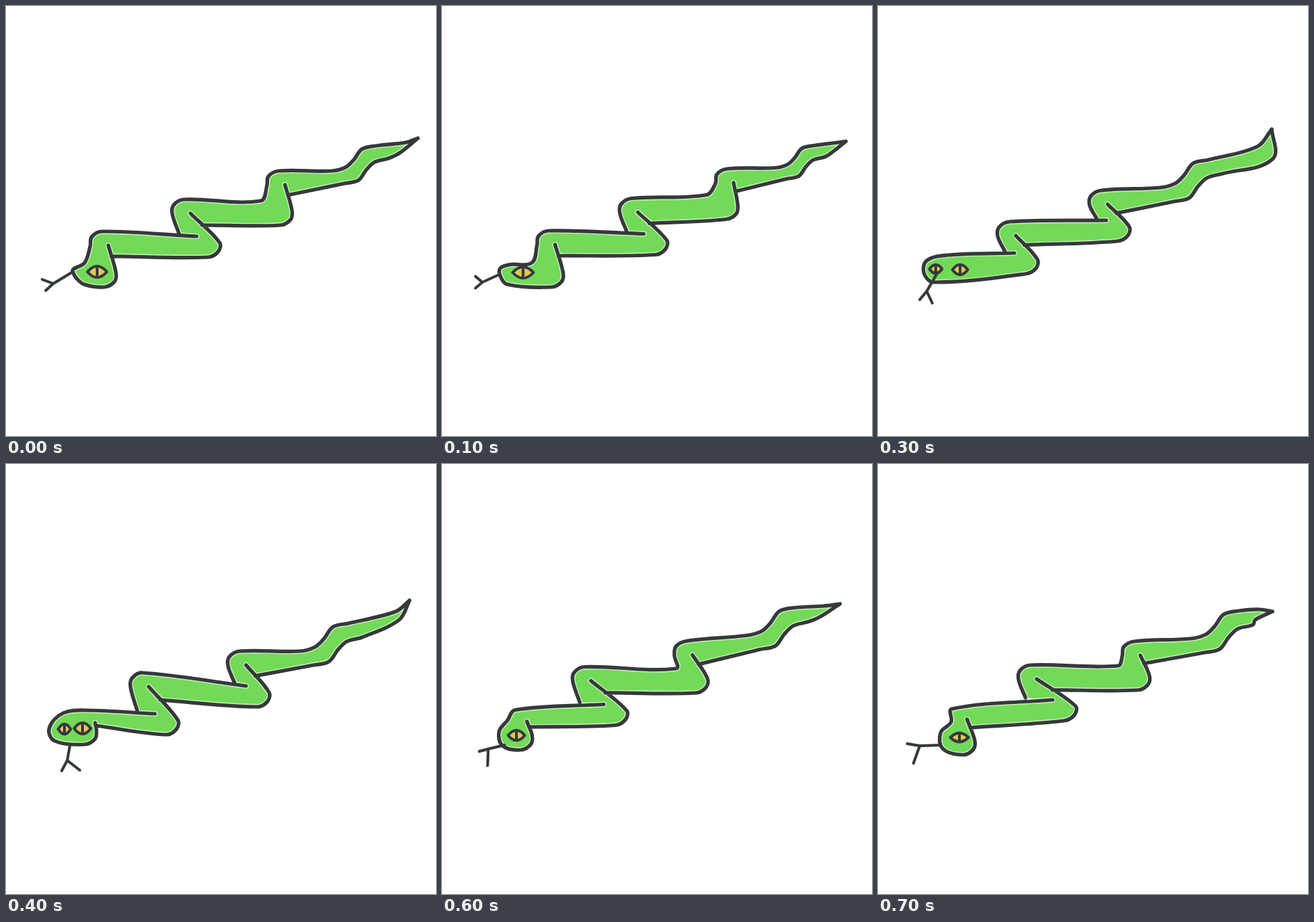
These frames come from a looping animation (618x618 px, 800 ms). An HTML page with a canvas:

```html
<!DOCTYPE html>
<html lang="en">
<head>
<meta charset="utf-8">
<title>Slithering snake</title>
<style>
html, body { margin: 0; width: 100%; height: 100%; overflow: hidden; background: #fff; }
canvas { display: block; width: 618px; height: 618px; }
</style>
</head>
<body>
<canvas id="stage" width="618" height="618"></canvas>
<script>
const ctx = document.getElementById('stage').getContext('2d');
const STEP = 100;
const INK = '#35393b', GREEN = '#72da58', PALE = '#cdeebb', IRIS = '#dfc957';

// tail: tip, a point above and a point below
// bends, tail to head: [x, y, size] is a wave, [left, top, right, bottom] a fold
// head: points round the snout; jaw: [right, bottom, crease x, crease y]
// tongue: root, fork, then the tips
const stretched = {
  tail: [[592, 190], [575, 196], [566, 211]],
  bends: [[509, 228, 0.9], [375, 237, 411, 315], [239, 278, 307, 361], [121, 324, 158, 404]],
  head: [[97, 378], [96, 382], [101, 391], [112, 400]],
  eyes: [[131, 382, 14, 9]],
  tongue: [[96, 382], [68, 399], [52, 393], [57, 409]]
};
const lowHead = {
  tail: [[569, 199], [557, 197], [556, 209]],
  bends: [[521, 221, 0.7], [411, 231, 439, 298], [272, 275, 339, 354], [152, 322, 190, 404]],
  head: [[100, 365], [72, 371], [66, 384], [75, 400]],
  eyes: [[102, 384, 16, 9]],
  tongue: [[66, 391], [48, 395], [44, 384], [39, 402]]
};
const facing = {
  tail: [[566, 177], [545, 202], [567, 220]],
  bends: [[450, 251, 1], [304, 265, 361, 338], [172, 310, 229, 385]],
  head: [[100, 358], [70, 366], [66, 384], [80, 397]],
  eyes: [[83, 378, 9, 7], [118, 379, 11, 8]],
  tongue: [[84, 386], [70, 410], [60, 422], [78, 427]]
};
const roundHead = {
  tail: [[580, 196], [560, 212], [565, 224]],
  bends: [[467, 259, 1], [319, 269, 378, 349], [179, 300, 247, 389]],
  head: [[115, 354], [82, 358], [62, 380], [70, 398]],
  jaw: [130, 403, 128, 372],
  eyes: [[84, 381, 9, 8], [110, 380, 12, 9]],
  tongue: [[92, 404], [88, 426], [80, 441], [106, 440]]
};
const turning = {
  tail: [[577, 190], [550, 199], [545, 215]],
  bends: [[470, 232, 1], [317, 254, 373, 333], [174, 294, 247, 382]],
  head: [[104, 355], [83, 366], [74, 383], [81, 401]],
  jaw: [120, 404, 116, 373],
  eyes: [[97, 387, 11, 9]],
  tongue: [[90, 404], [73, 414], [65, 424], [80, 437]]
};
const sideHead = {
  tail: [[567, 212], [548, 209], [542, 224]],
  bends: [[494, 241, 1], [351, 255, 390, 325], [202, 289, 284, 369]],
  head: [[106, 352], [105, 371], [90, 386], [93, 409]],
  jaw: [139, 418, 128, 367],
  eyes: [[117, 393, 13, 7]],
  tongue: [[90, 404], [60, 405], [42, 402], [51, 430]]
};

function mid(a, b) {
  if (typeof a === 'number') return (a + b) / 2;
  if (Array.isArray(a)) return a.map((v, i) => mid(v, b[i]));
  return Object.fromEntries(Object.keys(a).map(k => [k, mid(a[k], b[k])]));
}

const poses = [
  stretched, mid(stretched, lowHead), lowHead, facing,
  roundHead, turning, mid(turning, sideHead), sideHead
];

// each bend looks the same after half a turn: side 1 is the back, -1 the belly
const WAVE = [[25, -30], [3, -25], [-10, -8], [-23, 4], [-45, 10]];
const wave = ([x, y, size], side) =>
  WAVE.map(([dx, dy]) => [x + dx * size * side, y + dy * size * side]);
const corner = (x, y, side) =>
  [[x + 17 * side, y], [x + 2 * side, y + 8 * side], [x, y + 21 * side]];

// pen strokes from the tail along the back, round the head and home below
function outline({ tail: [tip, above, below], bends, head, jaw }) {
  const strokes = [[tip, above]];
  const add = (...pts) => strokes[strokes.length - 1].push(...pts);
  const lift = p => strokes.push([p]);

  function crease(x, y, ex, ey) {
    add(...corner(x, y, -1), [ex, ey]);
    lift([x + (ex - x) * 0.6, y - 21 + (ey - y + 21) * 0.6]);
  }

  for (const bend of bends) {
    const [x, y, right, bottom] = bend;
    if (bend.length === 3) {
      add(...wave(bend, 1));
      continue;
    }
    add(...corner(x, y, 1));
    if (right - x > 56) {
      add([x + 10, bottom - 33]);
      lift([right - 33, bottom - 30]);
    } else {
      add([right - 45, bottom - 35]);
    }
  }
  add(...head);
  if (jaw) crease(...jaw);
  for (const bend of [...bends].reverse()) {
    const [x, y, right, bottom] = bend;
    if (bend.length === 3) add(...wave(bend, -1));
    else crease(right, bottom, x + 26, y + 20);
  }
  add(below, tip);
  return strokes;
}

// smooth curve whose handles are a third of each chord
function curve(path, pts, join) {
  const handle = (p, from, to, len) => {
    const k = len / (Math.hypot(to[0] - from[0], to[1] - from[1]) || 1);
    return [p[0] + (to[0] - from[0]) * k, p[1] + (to[1] - from[1]) * k];
  };
  path[join ? 'lineTo' : 'moveTo'](...pts[0]);
  for (let i = 0; i < pts.length - 1; i++) {
    const b = pts[i], c = pts[i + 1], a = pts[i - 1] || b, d = pts[i + 2] || c;
    const len = Math.hypot(c[0] - b[0], c[1] - b[1]) / 3;
    path.bezierCurveTo(...handle(b, a, c, len), ...handle(c, d, b, len), ...c);
  }
}

function lines(strokes, joined) {
  const path = new Path2D();
  strokes.forEach((s, i) => curve(path, s, joined && i));
  return path;
}

function ink(path, width, color = INK) {
  ctx.lineWidth = width;
  ctx.strokeStyle = color;
  ctx.stroke(path);
}

function drawEye([x, y, rx, ry]) {
  const lid = new Path2D();
  lid.moveTo(x - rx, y);
  lid.quadraticCurveTo(x, y - 1.8 * ry, x + rx, y);
  lid.quadraticCurveTo(x, y + 1.8 * ry, x - rx, y);
  ctx.fillStyle = IRIS;
  ctx.fill(lid);
  ink(lid, 4);
  ink(lines([[[x, y - ry / 2], [x, y + ry / 2]]]), 4);
}

function draw(pose) {
  ctx.fillStyle = '#fff';
  ctx.fillRect(0, 0, 618, 618);
  ctx.lineCap = ctx.lineJoin = 'round';

  const strokes = outline(pose);
  const skin = lines(strokes, true), edge = lines(strokes);
  ctx.fillStyle = GREEN;
  ctx.fill(skin);
  ctx.save();
  ctx.clip(skin);
  ink(edge, 8, PALE);
  ctx.restore();
  ink(edge, 5.2);

  pose.eyes.forEach(drawEye);
  const [root, fork, ...tips] = pose.tongue;
  ink(lines([root, ...tips].map(end => [fork, end])), 4);
}

function tick(now) {
  draw(poses[Math.floor(now / STEP) % poses.length]);
  requestAnimationFrame(tick);
}
tick(0);
</script>
</body>
</html>
```
